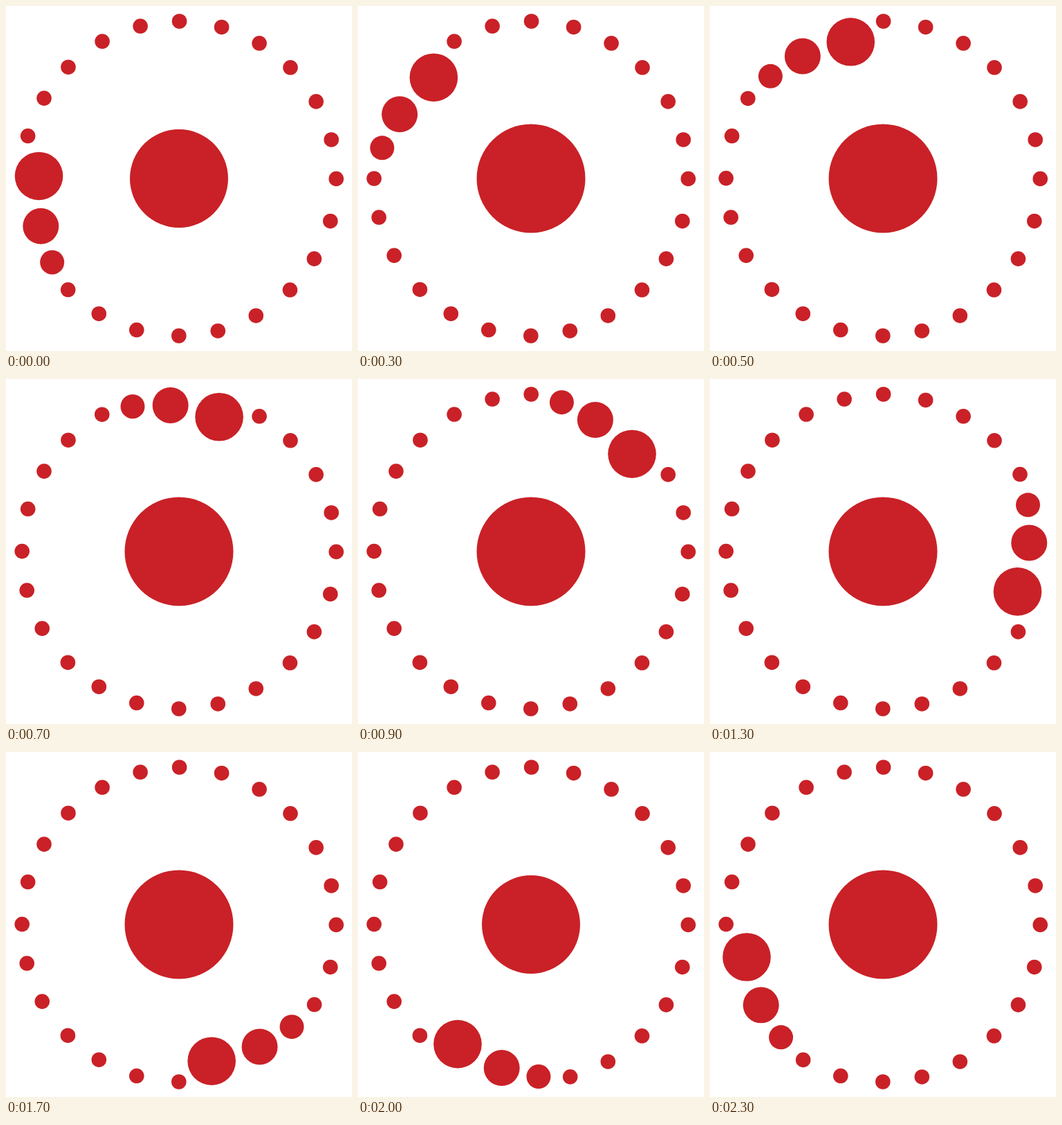
An HTML page with a canvas for the animation above (2.4 s loop, 500 by 498 pixels).

```html
<!DOCTYPE html>
<html lang="en">
<head>
<meta charset="utf-8">
<title>Circling dots</title>
<style>
  html, body { margin: 0; height: 100%; overflow: hidden; background: #fff; }
  canvas { display: block; }
</style>
</head>
<body>
<canvas id="stage" width="500" height="498"></canvas>
<script>
const ctx = document.getElementById('stage').getContext('2d');
const COUNT = 24, STEP_MS = 100, CX = 250.2, CY = 249;
const RING = 227, DOT = 10.8;

// The moving group: angle behind the leader, distance from the centre, radius
const GROUP = [
  [0, 202.7, 34.8],
  [20, 211.4, 26],
  [34.4, 219.8, 17.5],
  [46, RING, DOT]
];

function disc(x, y, r) {
  ctx.beginPath();
  ctx.arc(x, y, r, 0, 2 * Math.PI);
  ctx.fill();
}

// Angles run clockwise from the left, in degrees
function orbit(deg, dist, r) {
  const a = deg * Math.PI / 180;
  disc(CX - dist * Math.cos(a), CY - dist * Math.sin(a), r);
}

// Every third dot sits on its exact angle, the others slightly ahead
const dotAngle = i => 15 * i + (i % 3 ? 0.7 : 0.1);

function draw(step) {
  ctx.fillStyle = '#fff';
  ctx.fillRect(0, 0, 500, 498);
  ctx.fillStyle = '#c92127';
  disc(250, CY, step % 2 ? 78.5 : 71);

  for (let i = 0; i < COUNT; i++) {
    const behind = (step - i + COUNT) % COUNT;
    if (behind >= GROUP.length) orbit(dotAngle(i), RING, DOT);
  }
  const lead = dotAngle(step) + 0.9;
  for (const [lag, dist, r] of GROUP) orbit(lead - lag, dist, r);
}

const start = performance.now();
function tick() {
  draw(Math.floor((performance.now() - start) / STEP_MS) % COUNT);
  requestAnimationFrame(tick);
}
tick();
</script>
</body>
</html>
```
